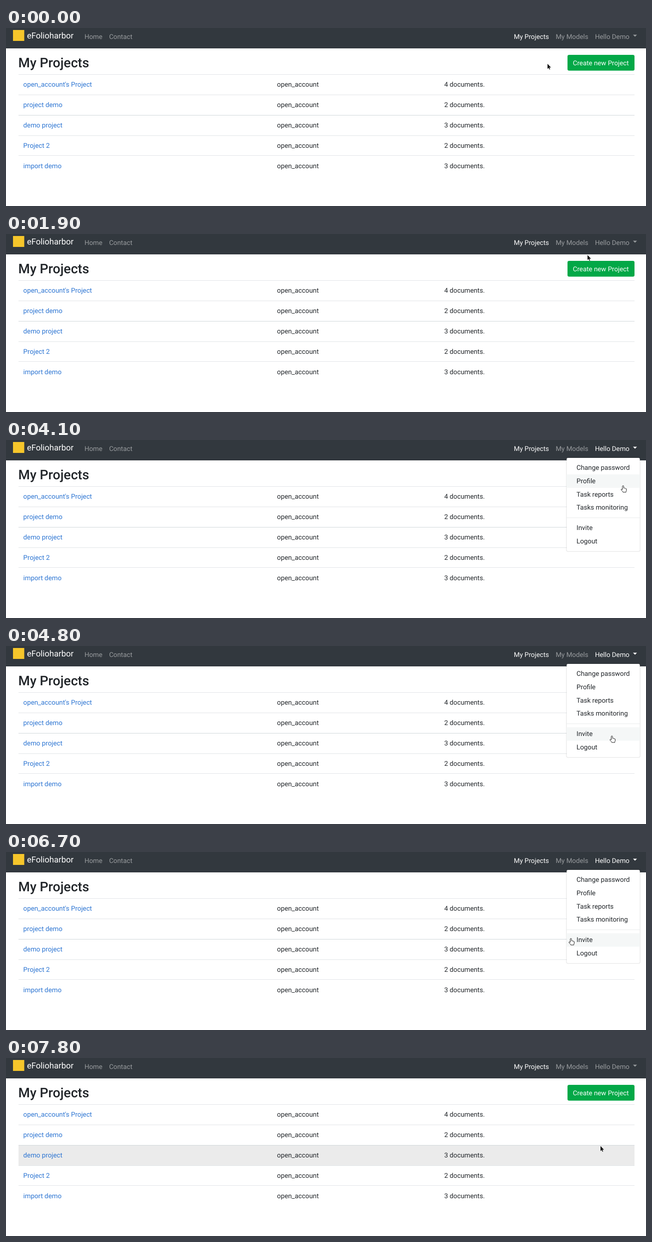
Recreate the animation shown at these times as an HTML page. Size 1280 px wide and 358 px high, loop 8 s.

```html
<!DOCTYPE html>
<html lang="en">
<head>
<meta charset="utf-8">
<title>My Projects</title>
<style>
  html, body { margin: 0; width: 100%; height: 100%; overflow: hidden; background: #fff; }
  svg { display: block; width: 1280px; height: 358px; }
  text { font-family: Roboto, sans-serif; font-size: 13.333px; fill: #212529; text-rendering: geometricPrecision; white-space: pre; }
</style>
</head>
<body>
<svg id="stage" viewBox="0 0 1280 358" xmlns="http://www.w3.org/2000/svg"></svg>
<script>
const LOOP = 8000, STEP = 100;
const OPEN = 3100, PRESS = 7700, RELOAD = 7800;
const DIM = '#999c9f', HOVER = '#cccecf', LIT = '#fff', INK = '#212529', BLUE = '#2b78e8';
const stage = document.getElementById('stage');

function add(tag, attrs, parent = stage) {
  const el = document.createElementNS(stage.namespaceURI, tag);
  for (const key in attrs) el.setAttribute(key, attrs[key]);
  parent.appendChild(el);
  return el;
}
const rect = (x, y, width, height, fill, parent) => add('rect', { x, y, width, height, fill }, parent);
function label(text, x, y, fill = INK, parent) {
  const el = add('text', { x, y }, parent);
  el.style.fill = fill;
  el.textContent = text;
  return el;
}
const show = (el, on) => el.setAttribute('visibility', on ? 'visible' : 'hidden');

// Navigation bar
const NAV = 21.8;
rect(0, 0, 1280, 41, '#32383e');
rect(14, 4, 22.5, 22, '#f6c62b');
label('eFolioharbor', 41.9, 21, LIT).style.fontSize = '16.667px';
label('Home', 156.9, NAV, DIM);
label('Contact', 206.2, NAV, DIM);
label('My Projects', 1015.8, NAV, LIT);
label('My Models', 1099.4, NAV, DIM);
const hello = label('Hello Demo', 1177.9, NAV, DIM);
const caret = add('path', { d: 'M1254 13.5h8l-4 4z' });

// Heading and button
const title = label('My Projects', 24.6, 79.3);
title.style.fontSize = '26.667px';
title.style.fontWeight = 500;
add('rect', { x: 1123, y: 54.1, width: 134, height: 31.6, rx: 3.3, fill: '#03a847' });
label('Create new Project', 1133.8, 74.8, LIT);

// Project table
const ROW = 40.85, TABLE = 93;
const rowHover = rect(25, 175, 1232, 41, '#ebebeb');
const user = 'open_account';
const projects = [[user + "'s Project", 4], ['project demo', 2], ['demo project', 3], ['Project 2', 2], ['import demo', 3]];
projects.forEach(([name, count], i) => {
  const y = TABLE + i * ROW;
  rect(25, Math.round(y), 1232, 1, i === 2 ? '#d3d8dc' : '#e2e5e8');
  label(name, 34.6, y + 25.3, '#2b74d2');
  label(user, 542.1, y + 25.3);
  label(count + ' documents.', 876.5, y + 25.3);
});

// Drop-down menu
const menu = add('g', {});
add('rect', { x: 1120.5, y: 35.3, width: 148, height: 189.2, rx: 3.3, fill: '#000', 'fill-opacity': 0.15 }, menu);
add('rect', { x: 1121.3, y: 36.1, width: 146.4, height: 187.6, rx: 2.5, fill: '#fff' }, menu);
rect(1121.3, 155.9, 146.4, 0.9, '#e6e9ec', menu);
const ITEM = 26.67;
const items = ['Change password', 'Profile', 'Task reports', 'Tasks monitoring', 'Invite', 'Logout'].map((name, i) => {
  const top = 43 + i * ITEM + (i > 3 ? 14.1 : 0);
  const back = rect(1121, top - 0.4, 147, 27, '#f5f7f7', menu);
  return { top, back, text: label(name, 1141.1, top + 17.4, INK, menu) };
});

// Pointers, tip at 0,0
const arrow = add('path', {
  d: 'M0 0V10.2L2.3 8.1 3.8 11.6 5.3 11 3.8 7.6H7Z',
  fill: '#111', stroke: '#fff', 'stroke-width': 0.8, 'paint-order': 'stroke'
});
const hand = add('path', {
  d: 'M-1.5 7.6V1.2a1.3 1.3 0 0 1 2.6 0V4.8q1.2-.7 2 .3 1.2-.4 1.8.5 1.5-.2 1.5 1.4v2q0 1.6-.8 2.8v1.2h-6q-.2-1-1.5-2.3-1.6-1.8-2.3-3 .3-1.5 1.8-.7z',
  fill: '#fff', stroke: '#222', 'stroke-width': 1, 'stroke-linejoin': 'round'
});

// Pointer path: time, x, y, ease-out power for y
const path = [
  [0, 1083, 72], [1100, 1083, 72], [2000, 1173, 41, 1.5], [2800, 1247.3, 19.2], [3700, 1247.3, 19.2],
  [4100, 1234.4, 92], [4600, 1223, 168.5], [4800, 1212, 181], [5200, 1172, 152], [5500, 1144, 164],
  [5600, 1131.5, 165.5], [6200, 1192, 172.5], [6300, 1192, 172.5], [6700, 1130, 174],
  [6800, 1130, 174], [7300, 1190.3, 175.2], [7700, 1190.3, 175.2], [7800, 1189, 177], [8000, 1189, 177]
];
function pointerAt(t) {
  const i = Math.max(1, path.findIndex(p => p[0] >= t));
  const [t0, x0, y0] = path[i - 1], [t1, x1, y1, power = 1] = path[i];
  const k = (t - t0) / (t1 - t0);
  return [x0 + (x1 - x0) * k, y0 + (y1 - y0) * (1 - (1 - k) ** power)];
}

function draw(time) {
  const t = Math.floor((time % LOOP) / STEP) * STEP;
  const [x, y] = pointerAt(t);
  const open = t >= OPEN && t < RELOAD;
  const overHello = x > 1171 && y < 34;
  const tint = open ? LIT : overHello ? HOVER : DIM;
  hello.style.fill = tint;
  caret.setAttribute('fill', tint);

  let overItem = false;
  show(menu, open);
  items.forEach(({ top, back, text }, i) => {
    const over = open && y >= top && y < top + ITEM;
    const pressed = over && i === 4 && t >= PRESS;
    overItem = overItem || over;
    show(back, over);
    back.setAttribute('fill', pressed ? BLUE : '#f5f7f7');
    text.style.fill = pressed ? LIT : INK;
  });
  show(rowHover, t >= RELOAD);

  const pointing = overHello || overItem;
  show(hand, pointing);
  show(arrow, !pointing);
  (pointing ? hand : arrow).setAttribute('transform', `translate(${x.toFixed(2)} ${y.toFixed(2)})`);
}

const start = performance.now();
function tick() {
  draw(performance.now() - start);
  requestAnimationFrame(tick);
}
draw(0);
tick();
</script>
</body>
</html>
```
